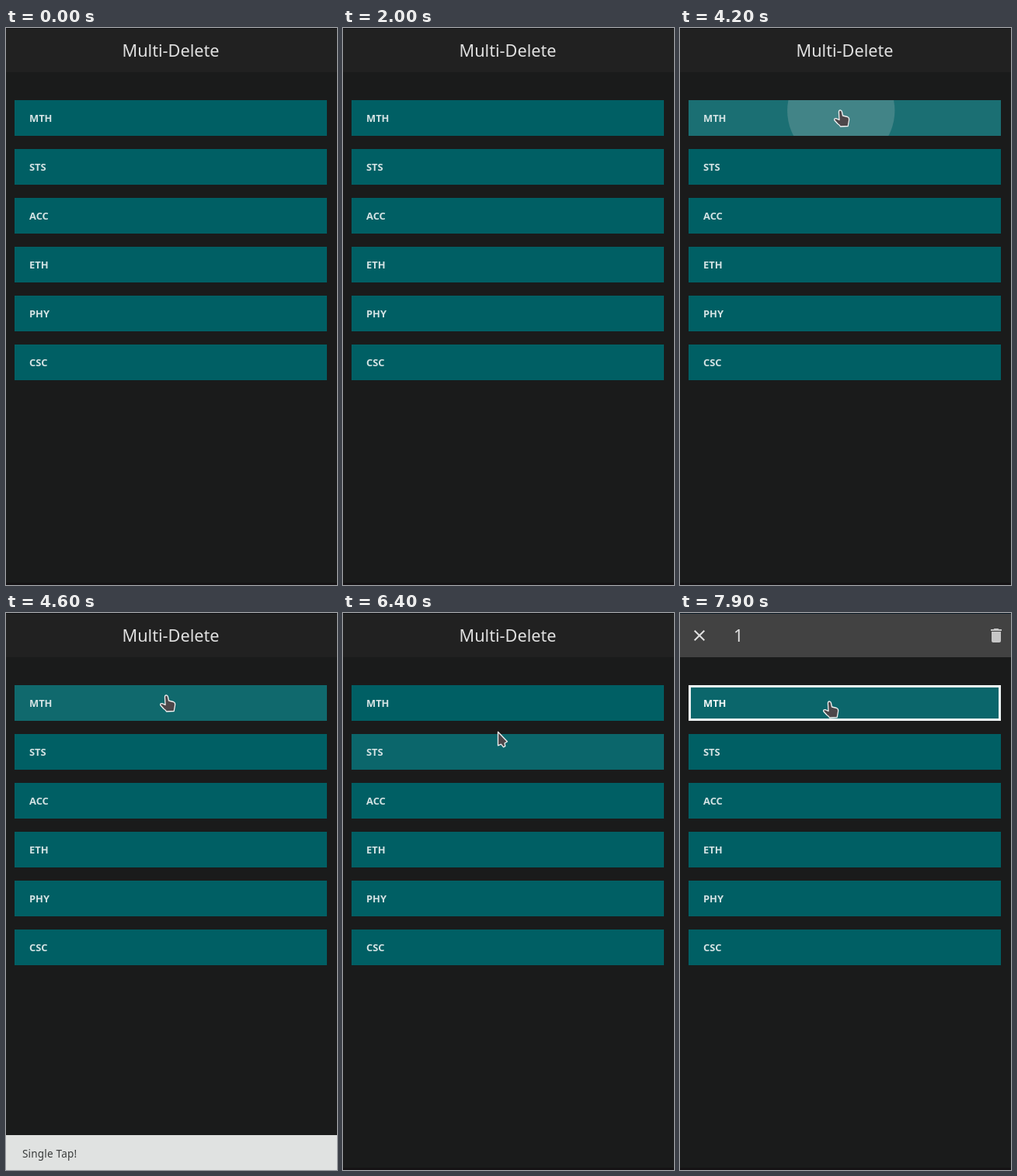
An HTML page with a canvas that plays this animation: 426x718 px, repeating every 8 s.

```html
<!DOCTYPE html>
<html lang="en">
<head>
<meta charset="utf-8">
<title>Multi-Delete</title>
<style>
  html, body { margin: 0; width: 100%; height: 100%; overflow: hidden; background: #1a1b1b; }
  canvas { display: block; }
</style>
</head>
<body>
<canvas id="stage" width="426" height="718"></canvas>
<script>
const ctx = document.getElementById('stage').getContext('2d');
const LOOP = 8000;
const FONT = '"Noto Sans", sans-serif';
const SELECT_AT = 7430;
const courses = ['MTH', 'STS', 'ACC', 'ETH', 'PHY', 'CSC'];
const row = { x: 11, y: 93, w: 402, h: 46, step: 63 };
const presses = [
  { down: 4135, up: 4240, x: 207, y: 106 },
  { down: 6930, up: SELECT_AT, x: 193, y: 114 },
];
// time, x, y of the pointer's hot spot
const pointerPath = [
  [2600, 390, 2], [3400, 208, 108], [3790, 208, 108], [3800, 207, 106], [5400, 207, 106],
  [6000, 203, 184], [6300, 202, 180], [6400, 199.5, 153.5], [6600, 193, 114], [LOOP, 193, 114],
];
const handShape = new Path2D('M-2.6 2.2Q-2.5 0-.7-.1Q1 0 1.4 2L2.5 7L8.5 8.5Q11 9.5 10.6 12.5L9.2 20.5L-.5 21Q-1.5 19-4 17.5L-8.3 12.8Q-8.8 10.3-6 10.6L-2 12.5Z');
const arrowShape = new Path2D('M0 0V17.5L4 15.8L7 19.5L9.3 18.3L8.6 14.5L12 12.5Z');
const trashShape = new Path2D('M6 19c0 1.1.9 2 2 2h8c1.1 0 2-.9 2-2V7H6zM19 4h-3.5l-1-1h-5l-1 1H5v2h14z');

const clamp = v => Math.max(0, Math.min(1, v));
const mix = (a, b, k) => a + (b - a) * k;

function bezier(x1, y1, x2, y2) {
  const at = (a, b, s) => 3 * a * s * (1 - s) ** 2 + 3 * b * s * s * (1 - s) + s ** 3;
  return x => {
    let lo = 0, hi = 1;
    for (let i = 0; i < 20; i++) {
      const mid = (lo + hi) / 2;
      if (at(x1, x2, mid) < x) lo = mid; else hi = mid;
    }
    return at(y1, y2, lo);
  };
}
const ease = bezier(.25, .1, .25, 1);
const fastOutSlowIn = bezier(.4, 0, .2, 1);

function rect(color, x, y, w, h) {
  ctx.fillStyle = color;
  ctx.fillRect(x, y, w, h);
}

function text(str, x, y, style, color, align = 'left') {
  ctx.font = `${style} ${FONT}`;
  ctx.textAlign = align;
  ctx.fillStyle = color;
  ctx.fillText(str, x, y);
}

function pointerAt(t) {
  const i = pointerPath.findIndex(p => p[0] > t);
  if (i < 1) return null;
  const [t0, x0, y0] = pointerPath[i - 1], [t1, x1, y1] = pointerPath[i];
  const k = (t - t0) / (t1 - t0);
  return { x: mix(x0, x1, k), y: mix(y0, y1, k) };
}

function rowUnder(p) {
  if (!p || p.y < row.y || (p.y - row.y) % row.step >= row.h) return -1;
  return Math.floor((p.y - row.y) / row.step);
}

function drawHeader(selecting) {
  rect(selecting ? '#424242' : '#212121', 0, 0, 426, 57);
  rect(selecting ? '#0b1a26' : '#101214', 0, 0, 426, 1);
  if (!selecting) {
    text('Multi-Delete', 212, 37, '21.7px', '#e0e0e0', 'center');
    return;
  }
  ctx.strokeStyle = '#e0e0e0';
  ctx.lineWidth = 2;
  ctx.stroke(new Path2D('M18.7 22.7L31.3 35.3M31.3 22.7L18.7 35.3'));
  text('1', 69, 37, '21.7px', '#e0e0e0');
  ctx.save();
  ctx.translate(395, 17);
  ctx.fillStyle = '#c6c6c6';
  ctx.fill(trashShape);
  ctx.restore();
}

function drawPress({ down, up, x, y }, t) {
  if (t < down || t > up + 400) return;
  const held = Math.min(t, up) - down, after = Math.max(0, t - up);
  const glow = clamp(clamp(held / 200) - after / 200);
  rect(`rgba(204,204,204,${.25 * glow})`, row.x, row.y, row.w, row.h);

  const grow = ease(clamp(held / 1000 + after / 225));
  const alpha = clamp((t - down) / 75) * clamp(1 - (after - 225) / 150);
  ctx.save();
  ctx.beginPath();
  ctx.rect(row.x, row.y, row.w, row.h);
  ctx.clip();
  ctx.beginPath();
  ctx.arc(mix(x, row.x + row.w / 2, grow), mix(y, row.y + row.h / 2, grow), mix(62, 207, grow), 0, 7);
  ctx.fillStyle = `rgba(204,204,204,${.25 * alpha})`;
  ctx.fill();
  ctx.restore();
}

function drawRows(t, selecting) {
  const hovered = rowUnder(pointerAt(t - 40));
  courses.forEach((name, i) => {
    const y = row.y + i * row.step, selected = selecting && i === 0;
    rect('#005f64', row.x, y, row.w, row.h);
    if (i === hovered) rect('rgba(255,255,255,.045)', row.x, y, row.w, row.h);
    if (i === 0) presses.forEach(p => drawPress(p, t));
    if (selected) {
      ctx.strokeStyle = '#f4f8f8';
      ctx.lineWidth = 3;
      ctx.strokeRect(row.x + 1.5, y + 1.5, row.w - 3, row.h - 3);
    }
    text(name, 30, y + 28, 'bold 12.9px', selected ? '#f4f8f8' : '#d3e2e3');
  });
}

function drawSnackbar(t) {
  const show = clamp((t - 4250) / 250) - clamp((t - 5500) / 250);
  if (show <= 0) return;
  const top = 718 - 45 * fastOutSlowIn(show);
  rect('#e0e2e1', 0, top, 426, 45);
  ctx.globalAlpha = clamp((show - .45) / .55);
  ctx.letterSpacing = '0.2px';
  text('Single Tap!', 21, top + 29, '13.5px', '#3a3c3c');
  ctx.letterSpacing = '0px';
  ctx.globalAlpha = 1;
}

function drawPointer(t) {
  const p = pointerAt(t);
  if (!p) return;
  const shape = rowUnder(p) < 0 ? arrowShape : handShape;
  ctx.save();
  ctx.translate(p.x, p.y);
  ctx.lineJoin = 'round';
  ctx.lineWidth = 1.3;
  ctx.strokeStyle = '#f0f0f0';
  ctx.fillStyle = '#4d474a';
  ctx.fill(shape);
  ctx.stroke(shape);
  ctx.restore();
}

function frame() {
  const t = performance.now() % LOOP;
  const selecting = t >= SELECT_AT;
  rect('#1a1b1b', 0, 0, 426, 718);
  rect('#151315', 0, 715, 426, 3);
  drawHeader(selecting);
  drawRows(t, selecting);
  drawSnackbar(t);
  drawPointer(t);
  requestAnimationFrame(frame);
}
frame();
</script>
</body>
</html>
```
